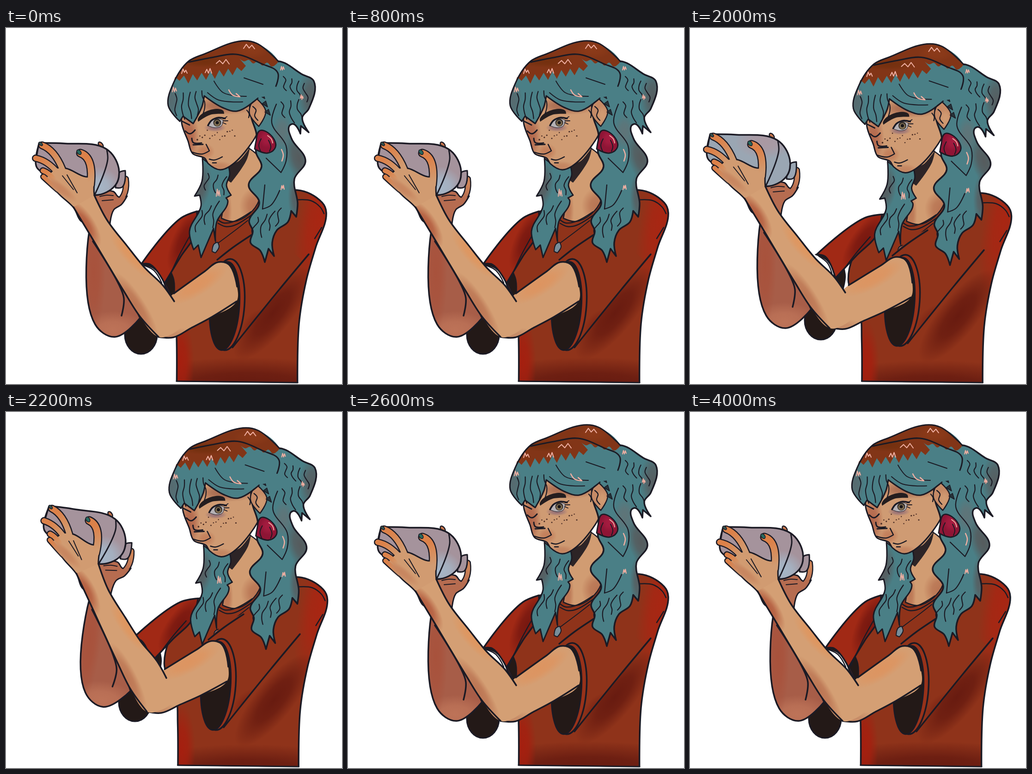
Animation of 727x771 px, one loop 6.2 s. Source, as an HTML page with a canvas:

```html
<!DOCTYPE html>
<html lang="en">
<head>
<meta charset="utf-8">
<title>Holding the bowl</title>
<style>
html, body { margin: 0; width: 100%; height: 100%; overflow: hidden; background: #fff; }
canvas { display: block; }
</style>
</head>
<body>
<canvas id="stage" width="727" height="771"></canvas>
<script>
const c = document.getElementById('stage').getContext('2d');
const INK = '#1b1a24', SKIN = '#d49f74', SHIRT = '#8f331a', TEAL = '#4a7f86', BLACK = '#231917', PINK = '#f0afa2';
const ELBOW = [330, 668], SHOULDER = [412, 397], CUFF = [490, 560];

// Offsets are [dx, dy]; angles are in degrees.
const REST = { body: [0, 0], elbow: [0, 0], fore: 0, far: 0, cuff: [0, 0], upper: 0, hole: [0, 0] };
const RAISED = { body: [2.5, 6.5], far: 12, cuff: [-19, -9], upper: 4 };
const HIGH = { ...REST, ...RAISED, elbow: [-25, -20], fore: 6.2, hole: [-13, -36] };
const LOW = { ...REST, ...RAISED, elbow: [-28, -19], hole: [-9, -31], cool: true };
const BLINK = { ...REST, blink: true };
const LOOP = 6200;
const steps = [[0, REST], [600, BLINK], [800, REST], [1800, HIGH], [2000, LOW], [2200, HIGH],
  [2400, LOW], [2600, REST], [3800, BLINK], [4000, REST]];

let seed;
const random = () => (seed = seed * 16807 % 2147483647) / 2147483647;
const jitter = size => (random() - .5) * size;

// Smooth path through x y pairs; sharp turns stay corners.
function curve(s, closed) {
  const n = s.trim().split(/\s+/).map(Number), p = [];
  for (let i = 0; i < n.length; i += 2) p.push([n[i], n[i + 1]]);
  const m = p.length, path = new Path2D();
  const at = i => p[closed ? (i + m) % m : Math.max(0, Math.min(m - 1, i))];
  const unit = (a, b) => {
    const l = Math.hypot(b[0] - a[0], b[1] - a[1]) || 1;
    return [(b[0] - a[0]) / l, (b[1] - a[1]) / l];
  };
  const heading = i => {
    const u = unit(at(i - 1), at(i)), v = unit(at(i), at(i + 1));
    return u[0] * v[0] + u[1] * v[1] < .2 ? [0, 0] : unit([0, 0], [u[0] + v[0], u[1] + v[1]]);
  };
  path.moveTo(...p[0]);
  for (let i = 0; i < (closed ? m : m - 1); i++) {
    const a = at(i), b = at(i + 1), u = heading(i), v = heading(i + 1);
    const l = Math.hypot(b[0] - a[0], b[1] - a[1]) / 3;
    path.bezierCurveTo(a[0] + u[0] * l, a[1] + u[1] * l, b[0] - v[0] * l, b[1] - v[1] * l, ...b);
  }
  if (closed) path.closePath();
  return path;
}

function line(s, width = 2.5, color = INK) {
  c.lineWidth = width;
  c.strokeStyle = color;
  s.split(',').forEach(part => c.stroke(curve(part)));
}

// Soft spot of colour: [x, y, rx, ry, colour, angle]
function shade([x, y, rx, ry, color, turn = 0]) {
  c.save();
  c.translate(x, y);
  c.rotate(turn * Math.PI / 180);
  c.scale(rx, ry);
  const g = c.createRadialGradient(0, 0, 0, 0, 0, 1);
  g.addColorStop(0, color);
  g.addColorStop(.45, color + 'cc');
  g.addColorStop(1, color + '00');
  c.fillStyle = g;
  c.fillRect(-1, -1, 2, 2);
  c.restore();
}

function shape(outline, fill, ink = 3, ...shades) {
  const path = typeof outline === 'string' ? curve(outline, true) : outline;
  c.fillStyle = fill;
  c.fill(path);
  c.save();
  c.clip(path);
  shades.forEach(shade);
  c.restore();
  if (!ink) return;
  c.lineWidth = ink;
  c.strokeStyle = INK;
  c.stroke(path);
}

function oval(x, y, rx, ry, turn = 0) {
  const path = new Path2D();
  path.ellipse(x, y, rx, ry, turn * Math.PI / 180, 0, 7);
  return path;
}
const dot = (x, y, r, color) => shape(oval(x, y, r, r), color, 0);

function moved([dx, dy], angle, [px, py], draw) {
  c.save();
  c.translate(px + dx, py + dy);
  c.rotate(angle * Math.PI / 180);
  c.translate(-px, -py);
  draw();
  c.restore();
}

// Jagged edge between two points
function teeth(x1, y1, x2, y2, n, depth) {
  let s = '';
  for (let i = 0; i <= n * 2; i++) {
    const k = i / n / 2;
    s += ` ${x1 + (x2 - x1) * k} ${y1 + (y2 - y1) * k + (i % 2 ? depth * (.6 + random() * .6) : 0)}`;
  }
  return s;
}

// A row of wavy hair lines hanging from the segment between two points
function strands(n, x1, y1, x2, y2, length, lean, wave = 4) {
  for (let i = 0; i < n; i++) {
    const k = n > 1 ? i / (n - 1) : 0, l = length * (.8 + random() * .4);
    let s = '';
    for (let j = 0; j < 5; j++)
      s += ` ${x1 + (x2 - x1) * k + lean * j / 4 + wave * Math.sin(j * 1.6 + i)} ${y1 + (y2 - y1) * k + l * j / 4}`;
    line(s, 2.2);
  }
}

function scribble(x, y, w, h) {
  let s = '';
  for (let i = 0; i < 5; i++) s += ` ${x + w * i / 4} ${y + (i % 2 ? -h : h) / 2 + jitter(4)}`;
  line(s, 2, PINK);
}

// Each finger: tip x y, bend x y, base x y, width
function fingers(list, palm, tip, base) {
  const paths = list.map(([x, y, bx, by, ex, ey]) => new Path2D(`M${x} ${y}Q${bx} ${by} ${ex} ${ey}`));
  const pass = (extra, colour) => paths.forEach((path, i) => {
    c.lineWidth = list[i][6] + extra;
    c.strokeStyle = colour(list[i]);
    c.stroke(path);
  });
  pass(5, () => INK);
  shape(palm, base, 3);
  pass(0, ([x, y, , , ex, ey]) => {
    const g = c.createLinearGradient(x, y, ex, ey);
    g.addColorStop(.2, tip);
    g.addColorStop(.9, base);
    return g;
  });
}

function torso() {
  shape('412 398 372 445 340 540 365 600 369 668 369 800 631 800 634 640 650 545 670 475 693 400 684 378 630 351 470 400', SHIRT, 3.5,
    [678, 410, 45, 170, '#a82613', 12], [520, 775, 280, 62, '#651a10'], [577, 618, 42, 125, '#681b10', 39], [377, 725, 30, 100, '#a51f0f']);
  line('632 372 660 374 680 388 688 402,683 432 668 456');
}

function neck() {
  shape('474 300 525 260 556 290 548 372 527 402 492 419 466 412 470 388', '#d19c72', 2.5,
    [540, 385, 35, 40, '#b87453'], [475, 395, 14, 50, '#bb7654']);
  shape('478 303 505 287 528 258 521 285 487 335 479 328', '#2d2426', 0);
  line('457 414 470 422 490 420 530 398,459 423 475 430 495 427 535 402');
  line('523 417 500 435 456 468,450 432 454 466', 2);
  shape('450 468 458 464 461 474 453 487 446 484', '#788e9a', 2);
}

function farSleeve() {
  shape('290 512 318 520 342 548 363 590 362 540 330 500', BLACK, 2);
  shape('413 397 378 412 293 511 312 512 343 553 378 495 410 445', '#a12915', 3.5, [388, 460, 28, 75, '#781810', 24]);
  line('298 514 320 525 337 552,398 450 376 490 348 550');
}

function farArm() {
  shape('180 440 193 642 235 669 290 628 262 570 215 480', '#a75d48', 3.5,
    [232, 655, 75, 42, '#bd7358'], [190, 530, 25, 130, '#a8523c']);
  fingers([[259, 327, 263, 358, 246, 374, 9]], '190 358 232 354 244 366 262 364 250 382 233 394 224 435 190 405', '#cf8558', '#b66c50');
  line('203 365 218 362 232 363,208 374 232 372', 2);
  shape(oval(205, 253, 7, 4, 50), '#c6764c', 2.5);
}

function bowl(cool) {
  const [base, tint] = cool ? ['#9aa6b3', '#aa98a2'] : ['#a5939c', '#a5b6c7'];
  shape('245 313 258 309 252 344 237 346', base);
  shape('72 249 125 250 217 262 244 304 237 340 193 362 110 325 68 304 64 290', base, 3.5,
    cool ? [190, 265, 65, 38, tint] : [200, 345, 48, 45, tint]);
  line('218 263 220 285 192 361,67 274 71 250', 3);
}

function hand() {
  fingers([[78, 254, 105, 264, 122, 306, 12], [64, 282, 90, 287, 112, 314, 11], [80, 309, 95, 314, 108, 334, 10],
    [81, 322, 95, 335, 112, 350, 9], [161, 271, 190, 280, 183, 340, 14]],
    '108 304 84 328 118 363 147 390 162 418 215 440 191 362 192 320 172 322 130 304', '#dc8149', '#d19b71');
  shade([118, 348, 45, 12, '#c7855f', 38]);
  line('122 320 146 350,132 318 154 357', 2);
  shape(oval(75, 251, 5, 3, 40), '#34524e', 1.5);
  shape(oval(158, 269, 6, 4, 50), '#27695f', 1.5);
}

function forearm() {
  const left = '146 388 182 448 255 570 290 625 330 669', right = '364 592 340 558 300 519 262 472 218 415 191 362';
  shape(`${left} 350 667 382 640 ${right}`, SKIN, 0, [168, 425, 24, 60, '#b25a3d', -33],
    [280, 600, 20, 85, '#bc7654', -33], [272, 490, 20, 70, '#df965f', -42]);
  line(`${left},${right},188 462 244 555 255 585 250 623`, 3.5);
}

function nearSleeve() {
  shape('453 506 533 447 600 470 642 505 490 692 510 590 478 502', SHIRT, 0, [545, 645, 45, 30, '#7c2414', -45]);
  line('457 502 490 476 533 447,655 490 590 568 490 692', 3.5);
  shape(oval(479, 599, 37, 99, 4), '#98321a', 3.5);
  shape(oval(473, 602, 32, 96, 4), BLACK);
}

function upperArm() {
  const under = '330 669 362 670 400 650 445 626 499 592', over = '500 560 482 512 459 507 430 527 363 575';
  shape(`316 655 ${under} ${over} 340 600`, SKIN, 0, [415, 555, 75, 24, '#dd9460', -32], [350, 667, 65, 20, '#c58a66']);
  line(`${under},${over}`, 3.5);
}

function leftLock() {
  shape('425 282 424 332 408 364 419 362 422 385 397 440 406 480 416 470 422 497 449 434 453 461 456 420 480 375 476 368 487 362 477 341 484 318 482 300 462 305',
    TEAL, 3, [418, 342, 26, 55, '#575b5e', 10]);
  strands(3, 437, 315, 474, 322, 45, -6);
  strands(3, 424, 395, 458, 375, 50, -14);
  scribble(455, 357, 8, 14);
}

function eye(blink) {
  shade([452, 216, 24, 9, '#967076']);
  if (blink) {
    line('438 207 446 213 459 214 477 202', 3.5);
    line('470 208 477 211,474 205 481 206', 2);
    return;
  }
  shape('438 212 445 201 460 196 470 200 466 212 452 216', '#b5b1b5', 1);
  dot(457, 205, 8.5, '#332d29');
  dot(457, 206, 6.5, '#806e51');
  dot(457, 205, 3.5, '#171519');
  line('437 211 445 200 460 194 474 196', 3.5);
  line('470 197 478 192,470 201 480 201,469 205 476 208', 1.8);
}

function face(blink) {
  shape('382 185 380 205 394 245 404 272 430 282 438 294 463 307 485 299 525 258 548 215 545 165 430 140', '#cf9b73', 3,
    [394, 235, 24, 55, '#b2664b'], [430, 268, 22, 18, '#c37e5a'], [475, 168, 70, 20, '#a7694f'], [463, 300, 28, 12, '#c38460']);
  shape('415 197 440 178 470 179 472 186 442 188 416 203', '#241d1f', 0);
  line('381 202 397 210,388 223 398 229 409 221', 3);
  eye(blink);
  line('402 239 405 248 423 249,405 253 426 252', 3);
  line('433 252 440 266 424 273 403 269,440 284 450 286 468 279,447 292 455 292');
  for (let i = 0; i < 16; i++)
    dot(414 + i * 5.4, 230 + jitter(24), 1.2 + random() * .6, '#4a2c24');
}

function rightHair() {
  shape('560 80 590 72 640 100 666 115 655 175 641 194 655 226 638 212 637 229 622 208 613 212 618 240 648 288 624 327 631 380 628 409 617 396 610 420 586 438 576 465 580 494 568 478 560 507 550 482 529 465 534 440 526 418 548 378 525 340 553 300 541 270 542 230 530 190 530 130',
    TEAL, 3.5, [660, 150, 28, 60, '#565e61'], [634, 282, 28, 60, '#565b5d', -18], [628, 365, 18, 55, '#565e61'], [598, 225, 22, 40, '#5f7478']);
  strands(4, 600, 105, 645, 120, 38, 6);
  strands(3, 595, 160, 630, 155, 40, 8);
  line('585 165 575 205 606 255 606 288 595 313 563 282,560 340 555 392 573 384 592 352', 2.3);
  strands(4, 545, 410, 595, 390, 45, -12);
}

function ear() {
  shape('527 186 530 165 541 152 562 180 547 213', '#c58a66', 2.5, [550, 190, 14, 22, '#d19b72']);
  line('534 170 541 178 538 190 545 200,521 178 526 186 525 194', 2.3);
  for (let i = 0; i < 3; i++) {
    const x = 555 + 6 * i, y = 147 + 18 * i;
    shape(`${x - 7} ${y - 1} ${x + 1} ${y - 7} ${x + 5} ${y + 6}`, '#27343a', 1.5);
  }
}

function crown() {
  const top = '376 202 351 168 362 120 395 72 430 56 510 28 542 33 590 73';
  const fringe = '545 152 500 180 470 173 429 147 424 170 405 207 383 191 376 202';
  shape(`${top} 592 100 580 140 ${fringe}`, TEAL, 0, [357, 155, 20, 45, '#566a6f']);
  shape('364 113 395 73 430 57 510 29 542 34 589 73' + teeth(585, 78, 505, 66, 4, 7) + teeth(519, 82, 366, 106, 8, 16), '#823517', 0,
    [530, 48, 40, 18, '#8b3a19'], [430, 72, 60, 14, '#74300f']);
  line(`${top},${fringe},395 74 445 64 498 57 552 77 588 97 584 126`, 3);
  strands(5, 366, 142, 426, 136, 48, 3, 3);
  line('436 140 460 156 512 160,450 115 470 140 520 148,515 108 556 122', 2);
}

function shine() {
  [[514, 40, 24], [455, 73, 28], [380, 94, 12], [431, 92, 14], [360, 134, 9], [594, 86, 8], [637, 150, 6], [595, 345, 7]]
    .forEach(([x, y, w]) => scribble(x, y, w, 8));
  line('482 134 490 145 506 149 498 142,596 263 600 275 597 288', 2.5, PINK);
}

function earring() {
  shape('548 223 560 223 583 248 581 262 565 271 538 262 541 245', '#8e1535', 2.8, [565, 240, 18, 20, '#a51c40']);
  line('552 240 547 254 551 267,568 243 573 257 570 267', 2);
  line('566 233 574 240 577 249', 2, PINK);
}

function render(p) {
  seed = 77;
  c.clearRect(0, 0, 727, 771);
  c.lineCap = c.lineJoin = 'round';
  c.save();
  c.clip(new Path2D('M0 0H727V769H633L369 766H0Z'));
  moved(p.body, 0, SHOULDER, () => { torso(); neck(); });
  c.restore();
  line(`${369 + p.body[0]} 765 ${631 + p.body[0]} 768`, 3);

  moved(p.body, p.far, SHOULDER, farSleeve);
  moved(p.hole, 0, ELBOW, () => shape(oval(292, 664, 35, 42), BLACK));
  moved(p.elbow, p.fore, ELBOW, farArm);
  moved(p.cuff, 0, CUFF, nearSleeve);
  moved(p.cuff, p.upper, CUFF, upperArm);
  moved(p.elbow, p.fore, ELBOW, () => { bowl(p.cool); hand(); forearm(); });
  moved(p.body, 0, SHOULDER, () => {
    leftLock();
    face(p.blink);
    rightHair();
    ear();
    crown();
    shine();
    earring();
  });
}

let shown;
function tick() {
  const t = performance.now() % LOOP;
  const pose = steps.findLast(([start]) => t >= start)[1];
  if (pose !== shown) render(shown = pose);
  requestAnimationFrame(tick);
}
tick();
</script>
</body>
</html>
```
